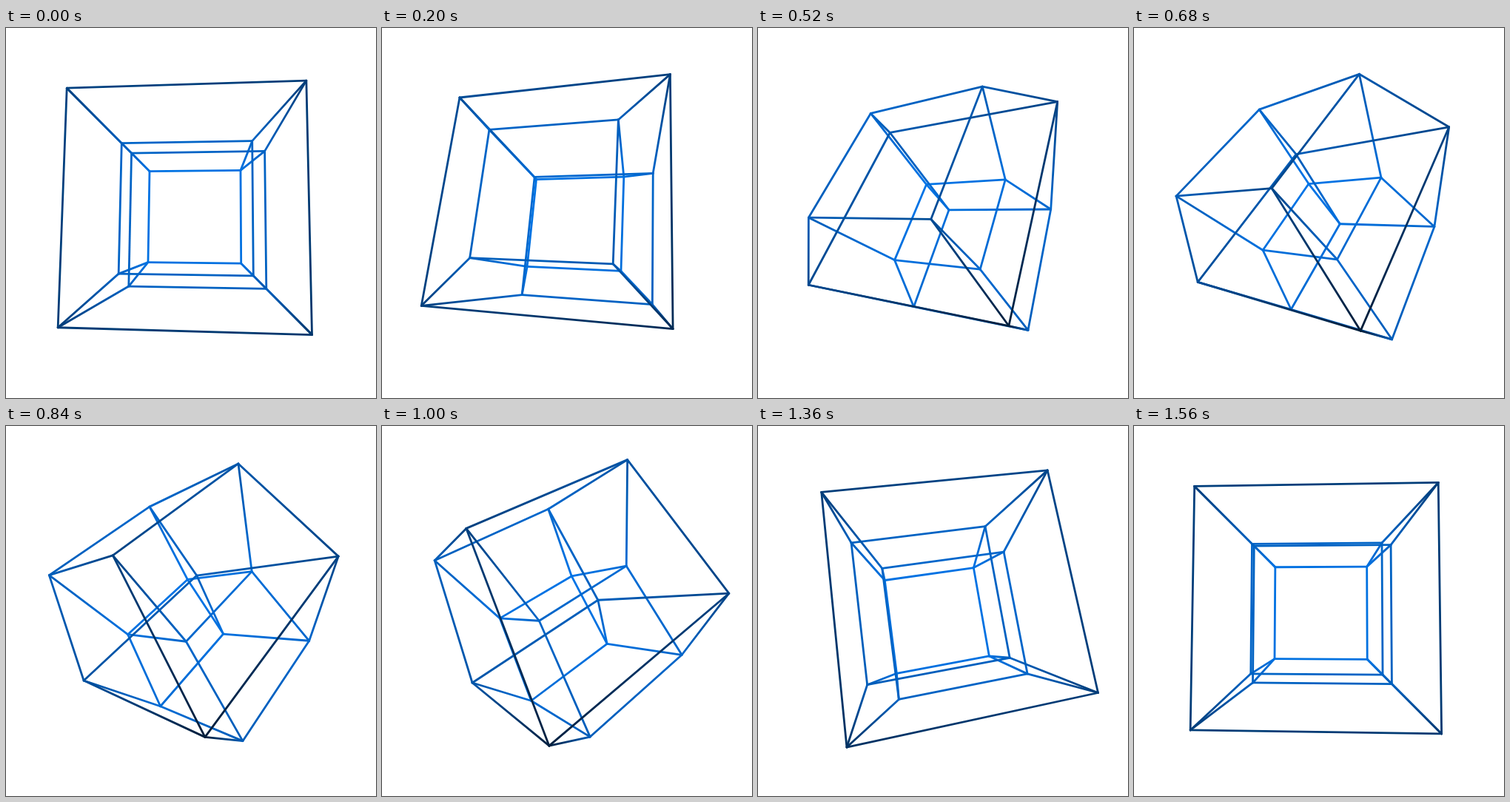
Write an HTML page with a canvas that moves like this. It is 500 px wide and 500 px high and loops after 1600 ms.

```html
<!DOCTYPE html>
<html lang="en">
<head>
<meta charset="utf-8">
<title>Rotating tesseract</title>
<style>
  html, body { margin: 0; width: 100%; height: 100%; overflow: hidden; background: #fff; }
  canvas { display: block; width: 500px; height: 500px; }
</style>
</head>
<body>
<canvas id="stage" width="500" height="500"></canvas>
<script>
const ctx = document.getElementById('stage').getContext('2d');
const CENTER = 250, SCALE = 90.8;
const DEPTH_Z = 0.2065, DEPTH_W = 0.25;
const STEP_MS = 40, STEPS = 40, START = 2;

// Corners are the bits of 0..15; edges join corners that differ in one bit.
const corners = Array.from({ length: 16 }, (_, i) =>
  [1, 2, 4, 8].map(bit => (i & bit ? 1 : -1)));
const edges = [];
for (let i = 0; i < 16; i++) {
  for (const bit of [1, 2, 4, 8]) if (!(i & bit)) edges.push([i, i | bit]);
}

const turn = (a, b, c, s) => [c * a - s * b, s * a + c * b];

function project([x, y, z, w], c, s) {
  [z, w] = turn(z, w, c, s);
  [y, z] = turn(y, z, c, s);
  [x, z] = turn(x, z, c, s);
  const near = 1 / (1 - DEPTH_Z * z - DEPTH_W * w);
  return { x: CENTER + SCALE * x * near, y: CENTER + SCALE * y * near, near };
}

function shade(near) {
  const k = Math.min(1, Math.max(0, 1.13 - 0.36 * near));
  return `rgb(0,${Math.round(128 * k)},${Math.round(255 * k)})`;
}

function drawEdge([a, b]) {
  const blend = ctx.createLinearGradient(a.x, a.y, b.x, b.y);
  blend.addColorStop(0, shade(a.near));
  blend.addColorStop(1, shade(b.near));
  ctx.strokeStyle = blend;
  ctx.beginPath();
  ctx.moveTo(a.x, a.y);
  ctx.lineTo(b.x, b.y);
  ctx.stroke();
}

function draw(step) {
  const angle = step / STEPS * Math.PI / 2;
  const c = Math.cos(angle), s = Math.sin(angle);
  const points = corners.map(v => project(v, c, s));
  ctx.fillStyle = '#fff';
  ctx.fillRect(0, 0, 500, 500);
  ctx.lineWidth = 2.8;
  ctx.lineCap = 'round';
  edges.map(([i, j]) => [points[i], points[j]])
    .sort((p, q) => p[0].near + p[1].near - q[0].near - q[1].near)
    .forEach(drawEdge);
}

let shown = -1;
function tick() {
  const step = (Math.floor(performance.now() / STEP_MS) + START) % STEPS;
  if (step !== shown) draw(shown = step);
  requestAnimationFrame(tick);
}
tick();
</script>
</body>
</html>
```
